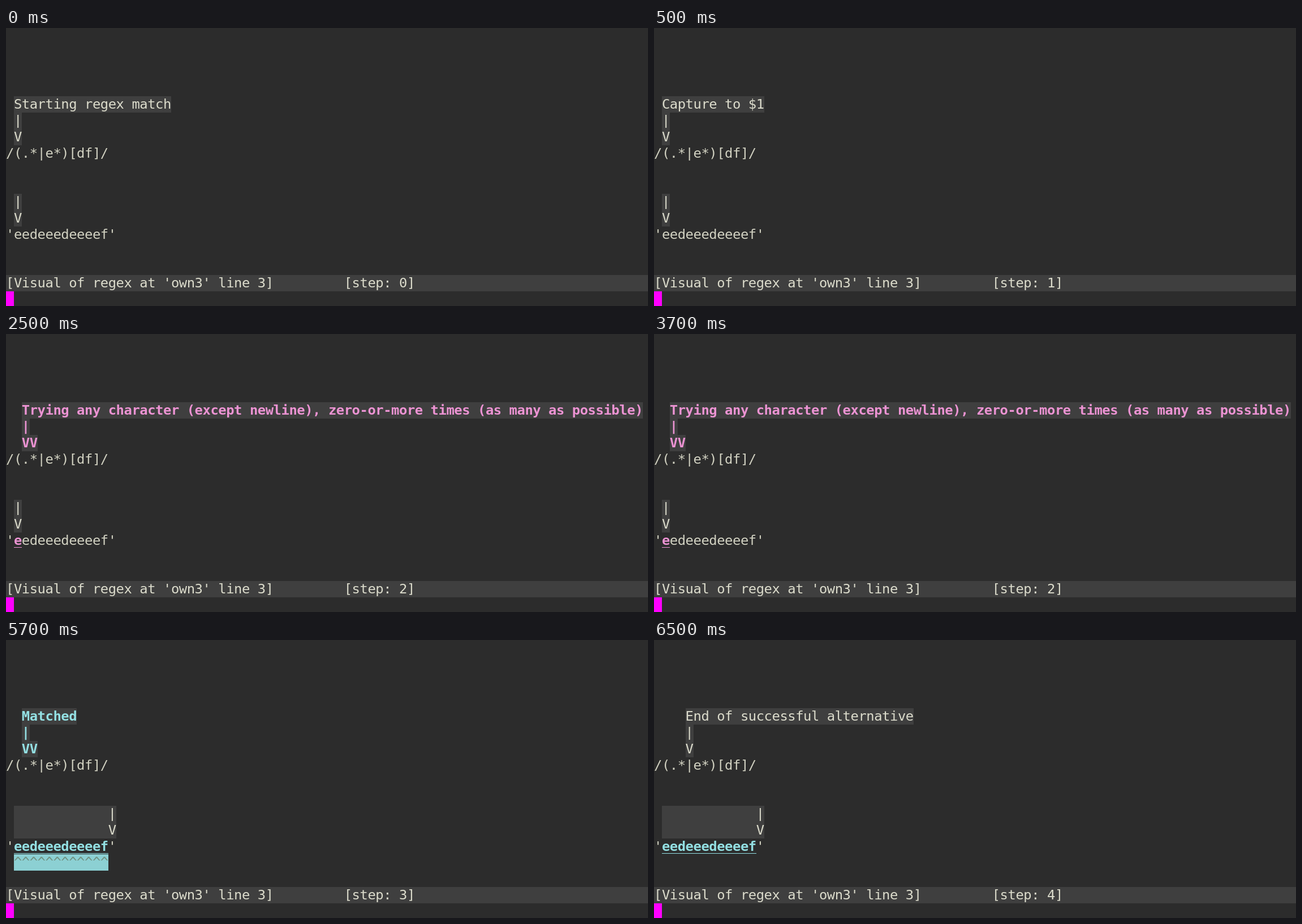
These frames come from a looping animation (1135 px wide and 493 px high, 8000 ms). An HTML page:

```html
<!DOCTYPE html>
<html lang="en">
<head>
<meta charset="utf-8">
<title>Regex match steps</title>
<style>
  :root { --w: 13.9px; --h: 28.79px; }
  html, body { margin: 0; width: 100%; height: 100%; overflow: hidden; background: #2c2c2c; }
  #stage {
    position: absolute; left: 0; top: 0; width: 1135px; height: 493px; overflow: hidden;
    font: 23.83px "DejaVu Sans Mono", monospace;
    font-variant-ligatures: none; font-kerning: none;
    color: #d2d2c2;
  }
  /* one scene per screen, stacked; the strip jumps a full screen at a time */
  #strip { position: absolute; inset: 0; animation: step 8s step-end infinite; }
  @keyframes step {
    0% { top: 0; }
    6.25% { top: -493px; }
    31.25% { top: -986px; }
    56.25% { top: -1479px; }
    81.25%, 100% { top: -1972px; }
  }
  .scene { position: relative; height: 493px; }
  .t {
    position: absolute; white-space: pre;
    left: calc(var(--c) * var(--w)); top: calc(121.2px + var(--r) * var(--h));
    height: var(--h); line-height: var(--h);
    letter-spacing: calc(var(--w) - 1ch);
  }
  .hi { background: #3f3f3f; color: #dcdccc; }
  .try { color: #ec93d3; font-weight: bold; }
  .ok { color: #93e0e3; font-weight: bold; }
  .mark { background: #8cd0d3; color: #709080; }
  .line::after {
    content: ""; position: absolute; left: 0; right: 0; top: 26.5px;
    height: 1px; background: currentColor;
  }
  #bar { right: 0; }
  #cursor { position: absolute; left: 0; top: 467px; width: 14px; height: 26px; background: #f0f; }
</style>
</head>
<body>
<div id="stage">
  <div id="bar" class="t hi" style="--c:0;--r:11">[Visual of regex at 'own3' line 3]         [step:  ]</div>
  <div id="strip"></div>
  <div id="cursor"></div>
</div>
<script>
  const subject = "eedeeedeeeef";
  const steps = [
    { note: "Starting regex match", col: 1, pos: 0 },
    { note: "Capture to $1", col: 1, pos: 0 },
    { note: "Trying any character (except newline), zero-or-more times (as many as possible)",
      col: 2, span: 2, tone: "try", pos: 0, matched: 1 },
    { note: "Matched", col: 2, span: 2, tone: "ok", pos: 12, matched: 12, carets: true },
    { note: "End of successful alternative", col: 4, pos: 12, matched: 12 }
  ];

  function put(scene, row, col, text, cls = "") {
    const el = document.createElement("div");
    el.className = "t " + cls;
    el.style.cssText = `--r:${row};--c:${col}`;
    el.textContent = text;
    scene.append(el);
  }

  steps.forEach(({ note, col, span = 1, tone = "", pos, matched = 0, carets }, i) => {
    const scene = document.createElement("div");
    scene.className = "scene";
    const add = (...args) => put(scene, ...args);

    add(0, col, note, "hi " + tone);
    add(1, col, "|", "hi " + tone);
    add(2, col, "V".repeat(span), "hi " + tone);
    add(3, 0, "/(.*|e*)[df]/");

    add(6, 1, " ".repeat(pos) + "|", "hi");
    add(7, 1, " ".repeat(pos) + "V", "hi");
    add(8, 0, "'");
    if (matched) add(8, 1, subject.slice(0, matched), "line " + (tone || "ok"));
    add(8, 1 + matched, subject.slice(matched) + "'");
    if (carets) add(9, 1, "^".repeat(matched), "mark");

    add(11, 50, String(i), "hi");
    document.getElementById("strip").append(scene);
  });
</script>
</body>
</html>
```
